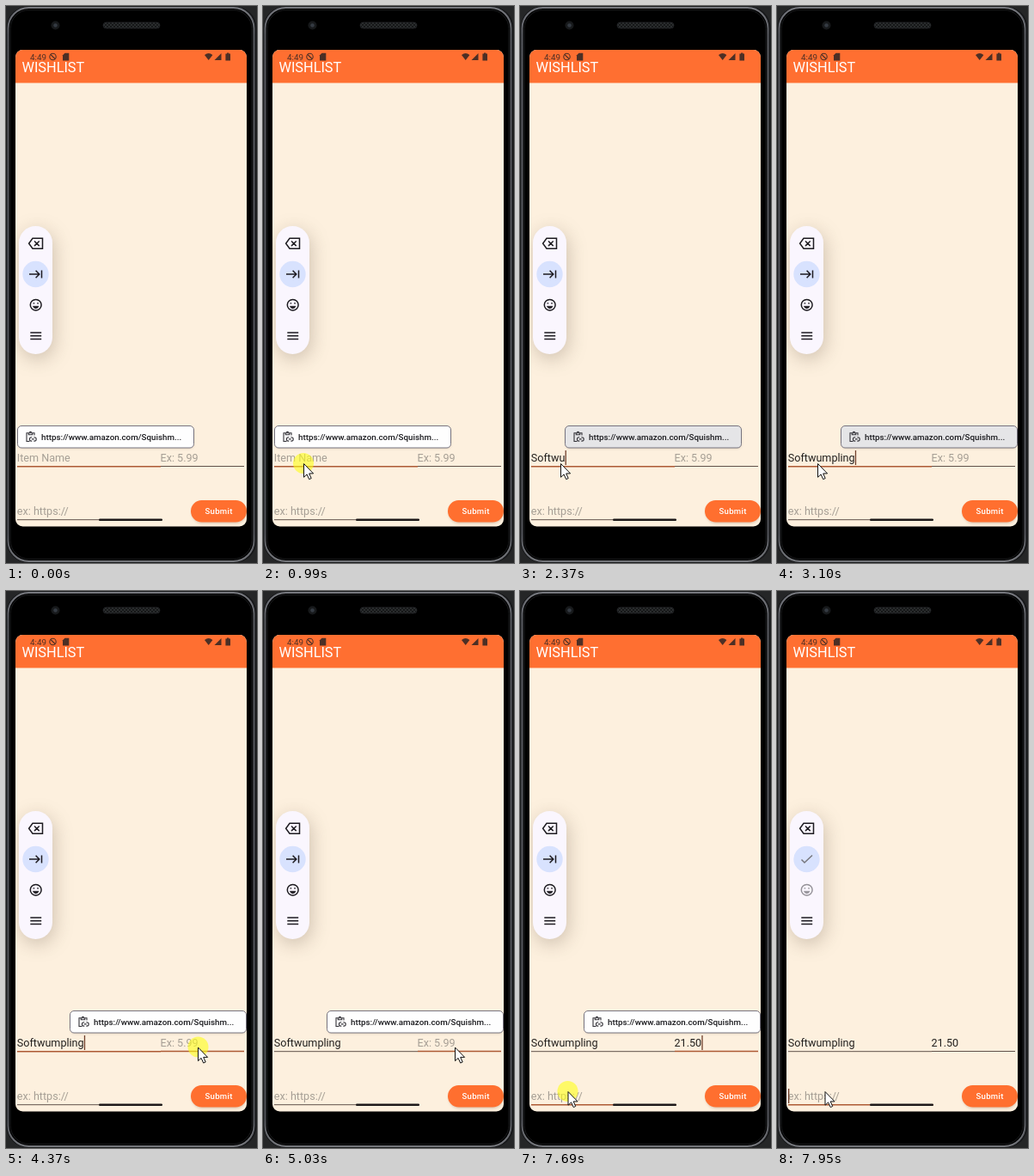
Animation, 292 px wide and 648 px high, one loop 8000 ms. Source, as an HTML page:

```html
<!DOCTYPE html>
<html lang="en">
<head>
<meta charset="utf-8">
<title>Wishlist</title>
<style>
  html, body { margin: 0; width: 100%; height: 100%; overflow: hidden; background: #252627; }
  svg { display: block; width: 292px; height: 648px; font-family: Roboto, "Open Sans", sans-serif; }
  text { white-space: pre; }
  .field { font-size: 12.6px; fill: #22201e; }
  .field.hint { fill: #a69f95; }
  .line { stroke: #5f5149; stroke-width: 1; }
  .line.on { stroke: #ad5a34; stroke-width: 1.4; }
  .ico { fill: none; stroke: #1d1b20; stroke-width: 1.5; }
  .status { fill: #4c2f25; }
</style>
</head>
<body>
<svg viewBox="0 0 292 648">
  <defs>
    <linearGradient id="rim" x1="0" x2="0" y1="0" y2="1">
      <stop offset="0" stop-color="#77797f"/>
      <stop offset=".05" stop-color="#595b61"/>
      <stop offset=".95" stop-color="#54565c"/>
      <stop offset="1" stop-color="#75777c"/>
    </linearGradient>
    <pattern id="mesh" width="4" height="4" patternUnits="userSpaceOnUse">
      <rect width="4" height="4" fill="#161718"/>
      <path d="M0 0L4 4M4 0L0 4" stroke="#303234" stroke-width=".8"/>
    </pattern>
    <clipPath id="screen"><rect x="11" y="51" width="269" height="554.5" rx="8.5"/></clipPath>
    <filter id="soft" x="-100%" y="-50%" width="300%" height="200%"><feGaussianBlur stdDeviation="11"/></filter>
    <filter id="low" x="-20%" y="-50%" width="140%" height="220%"><feGaussianBlur stdDeviation="1.6"/></filter>
  </defs>

  <!-- phone -->
  <rect width="292" height="648" fill="#252627"/>
  <rect x=".5" y=".5" width="291" height="647" rx="25" fill="#17181a"/>
  <rect x="2.5" y="2" width="286" height="644" rx="24" fill="#000" stroke="url(#rim)" stroke-width="2"/>
  <rect x="5" y="4.5" width="281" height="639" rx="22" fill="#000" stroke="#1b1c1e"/>
  <circle cx="57.5" cy="22.5" r="5" fill="#17191b"/>
  <circle cx="57.5" cy="22.5" r="2.3" fill="#343a42"/>
  <rect x="113" y="19" width="66" height="7" rx="3.5" fill="url(#mesh)" stroke="#26282a" stroke-width=".7"/>

  <g clip-path="url(#screen)">
    <rect x="11" y="51" width="270" height="555" fill="#fdf0de"/>
    <rect x="11" y="51" width="270" height="38.5" fill="#ff6f31"/>
    <text x="18.5" y="77" font-size="16.3" fill="#fff">WISHLIST</text>

    <!-- status bar -->
    <g class="status">
      <text x="28" y="62.5" font-size="9.8">4:49</text>
      <g fill="none" stroke="#4c2f25" stroke-width="1.1">
        <circle cx="54.5" cy="59" r="3.7"/><path d="M52 56.5L57 61.5"/>
      </g>
      <path d="M68.5 54.8H73.3V63.4H66V57.3Z"/>
      <path d="M231 57Q235.7 53.2 240.4 57L235.7 63Z"/>
      <path d="M250.5 55V63H242.5Z"/>
      <path d="M257 54.6H259.4V55.6H261V63.4H255.4V55.6H257Z"/>
    </g>

    <!-- key strip -->
    <rect x="17" y="262" width="39" height="149" rx="19.5" fill="#7a6a5a" opacity=".36" filter="url(#soft)"/>
    <rect x="15" y="256" width="39" height="149" rx="19.5" fill="#faf6fe"/>
    <circle cx="34.5" cy="312" r="15.2" fill="#d8e2fe"/>
    <path class="ico" d="M31 270.3H42.5V282.3H31L26.6 276.3ZM33 273.5L38.7 279.1M38.7 273.5L33 279.1"/>
    <path class="ico" id="tab" d="M27 312H38.6M34.6 307.8L38.8 312L34.6 316.2M41.5 307.5V316.5"/>
    <path class="ico" id="check" d="M28.5 312.5L32 316L41 307.5" style="stroke:#77777e"/>
    <g class="ico" id="smile">
      <circle cx="34.7" cy="347.8" r="6.4"/>
      <path d="M31.4 349.3H38Q37.2 352 34.7 352Q32.2 352 31.4 349.3Z" fill="#1d1b20" stroke-width=".6"/>
      <path d="M32.4 345.2V346.6M37 345.2V346.6" stroke-width="1.8"/>
    </g>
    <path class="ico" d="M28.3 380H41.2M28.3 383.8H41.2M28.3 387.6H41.2"/>

    <!-- form -->
    <path class="line" d="M13 535.7H180"/>
    <path class="line" d="M180 535.5H277"/>
    <path class="line" d="M13 597.7H182"/>
    <text class="field" x="12.8" y="530"></text>
    <text class="field" x="179.5" y="530"></text>
    <text class="field" x="12.8" y="592"></text>
    <rect id="caret" width="1.3" height="17" fill="#70402c"/>

    <rect x="216" y="576.5" width="63.5" height="25.5" rx="12.7" fill="#7a4a2c" opacity=".25" filter="url(#low)"/>
    <rect x="215" y="575" width="65" height="25.5" rx="12.7" fill="#ff6f2f"/>
    <text x="247.6" y="591.4" font-size="9.6" font-weight="500" letter-spacing=".25" text-anchor="middle" fill="#fff">Submit</text>
    <rect x="108" y="596.6" width="74" height="2.4" rx="1.2" fill="#1e1a1a"/>

    <!-- clipboard chip -->
    <g id="chip">
      <rect x="1" y="490" width="204.5" height="25" rx="5" fill="#6b5a48" opacity=".22" filter="url(#low)"/>
      <rect id="face" x=".5" y="488.5" width="205" height="25.5" rx="4.5" stroke="#77747f"/>
      <g fill="none" stroke="#333238" stroke-width="1.1">
        <path d="M14.5 506.5H11V496.8H20V499.5M13.3 497V498.8H17.7V497"/>
        <path d="M14.2 496.3Q15.5 494.4 16.8 496.3"/>
        <path d="M17.3 501.7H16.6A2.2 2.2 0 0 0 16.6 506.1H17.3M19.3 501.7H20A2.2 2.2 0 0 1 20 506.1H19.3M16.9 503.9H19.7"/>
      </g>
      <text x="28" y="505" font-size="9.8" font-weight="500" fill="#1b1b1f">https://www.amazon.com/Squishm...</text>
    </g>
  </g>

  <circle id="tap" r="12" fill="#ffff18" opacity=".6"/>
  <path id="mouse" d="M.5 .5V16.2L4.1 12.9L6.7 18.6L9.2 17.5L6.7 11.9H11.6Z" fill="#fff" stroke="#111" stroke-width="1" stroke-linejoin="round"/>
</svg>
<script>
const LOOP = 8000, STEP = 65;
const $ = id => document.getElementById(id);
const lines = document.querySelectorAll('.line');
const texts = document.querySelectorAll('.field');
const pen = document.createElement('canvas').getContext('2d');

const fields = [
  { x: 12.8, y: 517, hint: 'Item Name', text: 'Softwumpling',
    keys: [1450, 1780, 1910, 2040, 2170, 2300, 2570, 2700, 2770, 2900, 3030, 3100] },
  { x: 179.5, y: 517, hint: 'Ex: 5.99', text: '21.50', keys: [5360, 5560, 5760, 6160, 6290] },
  { x: 12.8, y: 579, hint: 'ex: https://', text: '', keys: [] }
];
const focusAt = [0, 4500, 7700];
const caretOn = [[450, 930], [1050, 3640], [4140, 5030], [5360, 6770], [7270, LOOP]];
// one tap per field: start, end, x, y
const taps = [[930, 1130, 47, 532], [4370, 4570, 223.5, 530.5], [7560, 7760, 55.5, 582]];
const greyChip = [[1515, 4370], [5360, 7560]];
const chipOn = [[0, 4570], [5030, 7950]];
// start, end, from, bend, to
const moves = [
  [390, 780, [149, 603], [92, 560], [47, 532]],
  [3900, 4170, [47, 532], [140, 528], [223, 530.5]],
  [7100, 7490, [219.5, 528.5], [135, 530], [55.5, 582]]
];

const during = (spans, t) => spans.find(([a, b]) => t >= a && t < b);
const show = (el, on) => { el.style.visibility = on ? 'visible' : 'hidden'; };
const place = (el, x, y) => el.setAttribute('transform', `translate(${x} ${y})`);
const typed = (f, t) => f.text.slice(0, f.keys.filter(k => k <= t).length);

function caretX(f, t) {
  pen.font = '12.6px Roboto, "Open Sans", sans-serif';
  return f.x + pen.measureText(typed(f, t)).width;
}

function mouseAt(t) {
  const m = moves.filter(m => t >= m[0]).pop();
  if (!m) return null;
  const [start, end, a, b, c] = m;
  const p = Math.min(1, Math.floor((t - start) / STEP) * STEP / (end - start));
  const e = p * p * (3 - 2 * p), q = 1 - e;
  return [0, 1].map(i => q * q * a[i] + 2 * q * e * b[i] + e * e * c[i]);
}

function draw(t) {
  const focus = focusAt.filter(s => s <= t).length - 1;
  const tap = during(taps, t);
  fields.forEach((f, i) => {
    const value = typed(f, t);
    texts[i].textContent = value || f.hint;
    texts[i].classList.toggle('hint', !value);
    lines[i].classList.toggle('on', i === focus || taps[i] === tap);
  });

  const f = fields[focus];
  show($('caret'), during(caretOn, t));
  place($('caret'), caretX(f, t) + .2, f.y);

  show($('chip'), during(chipOn, t));
  place($('chip'), Math.min(74, Math.round(caretX(f, t - STEP))), 0);
  $('face').setAttribute('fill', during(greyChip, t) ? '#e5e5e7' : '#fefefe');

  const done = t >= 7950;
  show($('tab'), !done);
  show($('check'), done);
  $('smile').style.opacity = done ? .45 : 1;

  show($('tap'), tap);
  if (tap) place($('tap'), tap[2], tap[3]);

  const at = mouseAt(t);
  show($('mouse'), at);
  if (at) place($('mouse'), ...at);
}

const begin = performance.now();
function tick() {
  draw((performance.now() - begin) % LOOP);
  requestAnimationFrame(tick);
}
tick();
</script>
</body>
</html>
```
